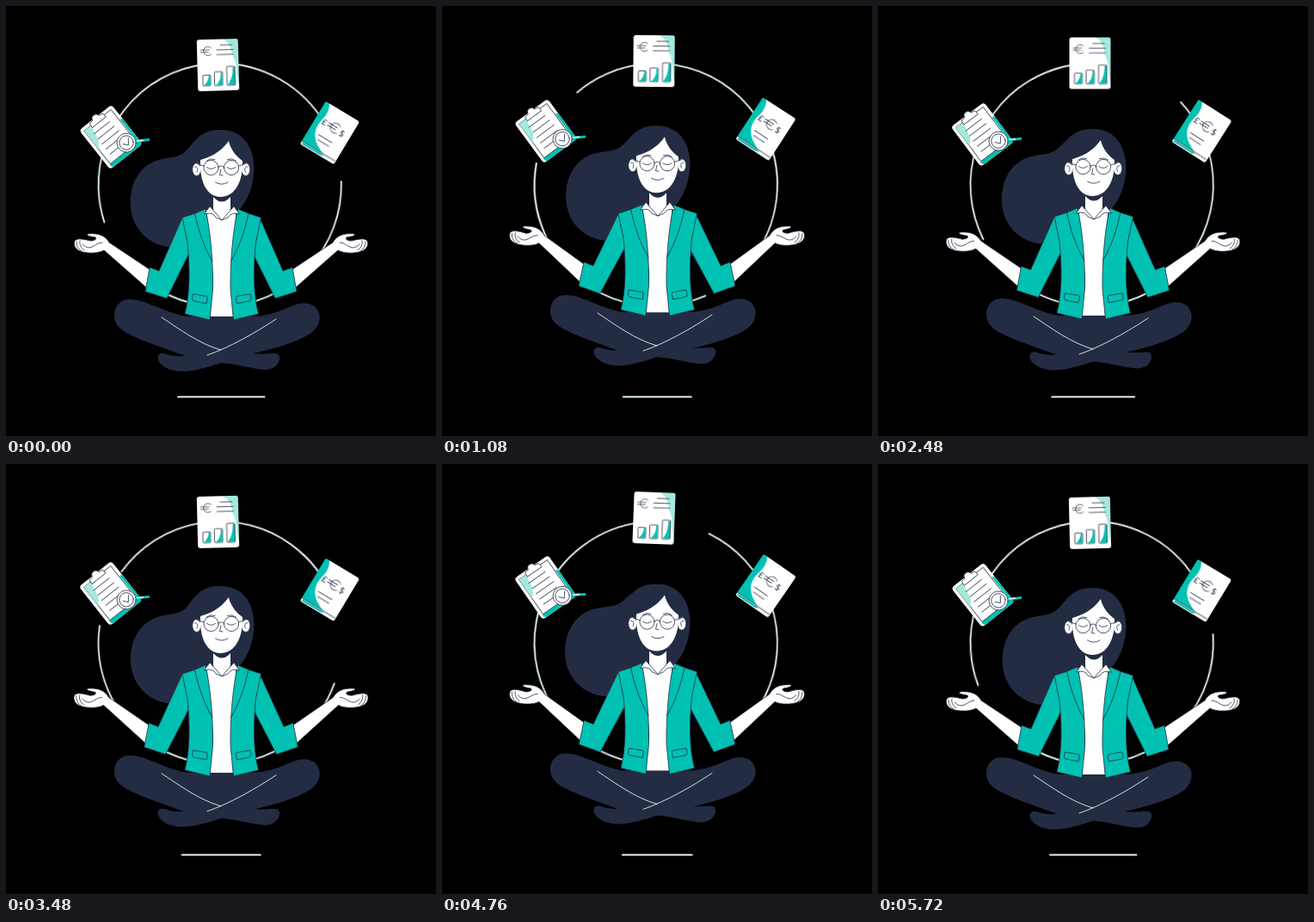
Write an HTML page that moves like this. It is 500 px wide and 500 px high and loops after 5.76 s.

```html
<!DOCTYPE html>
<html lang="en">
<head>
<meta charset="utf-8">
<title>Balance</title>
<style>
  html, body { margin: 0; width: 100%; height: 100%; overflow: hidden; background: #000; }
  svg { display: block; width: 100vw; height: 100vh; }

  .ink { fill: #242c43; }
  .teal { fill: #00c1b2; }
  .white { fill: #fff; }
  .mint { fill: #a5e8de; }
  .edge { stroke: #242c43; stroke-width: .8; stroke-linejoin: round; }
  .pen { fill: none; stroke: #242c43; stroke-width: .8; stroke-linecap: round; stroke-linejoin: round; }
  .pale { fill: none; stroke: #e2f4f2; stroke-width: 1.9; stroke-linecap: round; }
  text { font: 10px Lato, "Open Sans", sans-serif; fill: #242c43; text-anchor: middle; }

  /* one half of the sine-shaped bob lasts 1440 ms */
  .rise, .turn, .lift, .shadow {
    animation: rise 1440ms cubic-bezier(.364, 0, .636, 1) infinite alternate;
  }
  .turn { animation-name: turn; }
  .lift { animation-name: rise, turn; }
  .shadow { animation-name: shrink; transform-origin: 250px 454px; }
  .late { animation-delay: -2722ms, -2592ms; }
  .spin { animation: spin 5760ms linear infinite; transform-origin: 248.7px 208px; }

  @keyframes rise { from { translate: 0 0; } to { translate: var(--x, 0px) var(--y); } }
  @keyframes turn { from { rotate: 0deg; } to { rotate: var(--r); } }
  @keyframes shrink { from { transform: scaleX(1); } to { transform: scaleX(.755); } }
  @keyframes spin { to { transform: rotate(360deg); } }

  .body { --y: -5.6px; }
  .legs { --y: -5.8px; }
  .feet { --y: -7.8px; }
  .hair { --x: 1.5px; --y: -8.5px; --r: 3.2deg; transform-origin: 250px 165px; }
  .arm { --r: 2.5deg; transform-origin: 206px 250px; }
  .item { --y: -6.5px; --r: 4.1deg; }
  .board { --x: -2px; --y: -10.2px; }
</style>
</head>
<body>
<svg viewBox="0 0 500 500">
  <defs>
    <path id="euro" class="pen" d="M5.5-4.2A5.8 5.8 0 1 0 5.5 4.2M-8-1.5H3M-8 1.5H2"/>

    <g id="arm">
      <path class="white edge" d="M168 307L120 275C116 268 109 263.500 95 265C93 267 98 268 104 269C106 271 103 273 98 273C90 271 83 269.500 80 273C78 278 81 283 86 285C94 288 107 288 114 284L164 328Z"/>
      <path class="pen" d="M112 275C106 275 103 280 97 281C93 281 91 279 89 277M82 274C82 279 84 283 88 285M86 273C85 277 87 281 91 284"/>
      <path class="teal" d="M205 246L178 308L167 304L162 332L187 340L214 286L228 255Z"/>
      <path class="pen" d="M205 246L178 308L167 304L162 332L187 340L212.500 288"/>
    </g>

    <g id="panel">
      <path class="teal edge" d="M205 246Q219 242 232 236C238 262 241 300 240.500 330L237 365L208 358C214 335 214 305 211 275Z"/>
      <path class="pen" d="M219.500 241C224 262 230 280 240 297"/>
      <path class="pen" d="M218 335L233 337.500Q235 338 234 341L233 346L218 343Q216 342 216.500 339Z"/>
    </g>

    <g id="side">
      <ellipse class="white edge" cx="221.700" cy="190" rx="5" ry="7.500"/>
      <path class="pen" d="M219.500 187C222 186 224 189 222 193"/>
    </g>

    <g id="eye">
      <circle class="pen" cx="238.500" cy="188" r="8.600"/>
      <path class="pen" d="M233.500 187.500Q238.500 191.500 243.500 187.500M233 180Q238 176.500 243 178.500M230 186L222 183.500"/>
    </g>
  </defs>

  <g class="spin">
    <circle class="pale" cx="248.7" cy="208" r="141.2" pathLength="360"
      stroke-dasharray="124.300 39.300 168.500 27.900" transform="rotate(-1.600 248.700 208)"/>
  </g>

  <!-- report -->
  <g transform="translate(246.500 68.700)"><g class="lift late item"><g transform="rotate(-1.900)">
    <rect class="white" x="-24" y="-30" width="48" height="60" rx="3"/>
    <path class="mint" d="M6-30H21Q24-30 24-27V24C21 14 23 4 19-6C15-15 18-23 6-30Z"/>
    <use href="#euro" transform="translate(-12.500 -16.500) scale(.9)"/>
    <path class="pen" d="M3-23H17M-1-17.500H18M-1-12H18"/>
    <g class="white edge">
      <rect x="-18" y="11.500" width="9" height="12.500" rx="1"/>
      <rect x="-4.500" y="8" width="9.500" height="16" rx="1"/>
      <rect x="10" y="2" width="9.500" height="22" rx="1"/>
    </g>
    <path class="teal" d="M-17 23.500Q-12 20-11 12H-9.400V23.500ZM-3 23.500Q3 19 3 9H4.600V23.500ZM11 23.500Q17 16 17 3H19V23.500Z"/>
  </g></g></g>

  <!-- clipboard -->
  <g transform="translate(122 152.700)"><g class="lift late item board"><g transform="rotate(-38.800)">
    <rect class="white" x="-24" y="-29" width="48" height="58" rx="4"/>
    <path class="teal" d="M-21 24H21V-10L24-8V25Q24 29 20 29H-18Q-22 28-21 24Z"/>
    <path class="white edge" d="M-20-25H20V24H-20Z"/>
    <path class="mint" d="M-20-25H-9C-13-16-10-6-20 2Z"/>
    <path class="white edge" d="M-10-22V-26Q-10-28-7-28H-5Q-4-32.500 0-32.500T5-28H7Q10-28 10-26V-22Z"/>
    <path class="pen" d="M-13-15H10M-13-7.500H11M-13 0H12M-13 7.500H11M-13 15H2"/>
  </g></g></g>
  <g transform="translate(140 159.200)"><g class="lift late item"><g transform="rotate(-8)">
    <path d="M11 0H26" fill="none" stroke="#00c1b2" stroke-width="3" stroke-linecap="round"/>
    <path d="M12-.4H20" fill="none" stroke="#fff" stroke-width="1.400"/>
    <circle class="white edge" r="11"/>
    <circle class="pen" r="8.200"/>
    <path class="pen" d="M3-5L2 3L-4 1"/>
  </g></g></g>

  <!-- book -->
  <g transform="translate(376.500 147.700)"><g class="lift late item"><g transform="rotate(30.600)">
    <rect class="white" x="-23" y="-29" width="46" height="58" rx="2.500"/>
    <path class="teal" d="M-23 25V-26.500Q-23-29-20.500-29H-18C-13-21-14-14-16-6C-18 6-14 18 7 25Z"/>
    <path class="pen" d="M-22 25H22"/>
    <path class="teal" d="M-21 26H8L4 28H-21Z"/>
    <use href="#euro" transform="translate(1.500 -8) scale(1.050)"/>
    <text x="-11.500" y="-4.500">£</text>
    <text x="12.500" y="-3">$</text>
    <path class="pen" d="M-10 8.500H8M-8 14H7"/>
  </g></g></g>

  <!-- hair behind -->
  <path class="ink lift late hair" d="M240 152C226 154 218 160 212 166C202 179 190 175 174 181C155 188 145 207 145 229C145 260 168 281 196 281L250 262Z"/>
  <path class="ink rise body" d="M250 144C232 143 222 152 212 166V225L215 250H255L268 240C279 231 288.500 210 288.500 188C288 162 274 144 250 144Z"/>

  <!-- legs -->
  <path class="ink rise feet" d="M235 396C212 411 195 408 184 404C175 402 174 412 182 418C195 428 215 427 250 415C280 417 300 428 312 420C320 414 320 404 313 404C300 404 285 407 265 398Z"/>
  <g class="rise legs">
    <path class="ink" d="M209 361C190 357 172 348 160 344Q152 341 144 341C126 341 121 362 131 373C142 385 180 396 214 409L250 405L283 405C315 398 340 390 355 380C367 371 368 355 357 348C349 344 341 345 332 349C320 354 308 359 292 361Z"/>
    <path class="pale" style="stroke-width:.9" d="M181 362C202 376 225 393 250 400M314 364C290 380 260 397 234 406"/>
  </g>

  <!-- torso, arms, head -->
  <g class="rise body">
    <g class="turn arm"><use href="#arm"/></g>
    <g transform="matrix(-1 0 0 1 500 0)"><g class="turn arm"><use href="#arm"/></g></g>
    <path class="white" d="M233 237H268L262 300L264 361H237L241 320L238 280Z"/>
    <use href="#panel"/>
    <use href="#panel" transform="matrix(-1 0 0 1 501.500 0)"/>
    <path class="white" d="M241 215H261V236L251 249L241 236Z"/>
    <path class="ink" d="M241 213H261V222Q251 233 241 222Z"/>
    <path class="white edge" d="M237 233L230.500 242Q241 239 244 246L251 249ZM265 233L271.500 242Q262 239 258 246L251 249Z"/>

    <use href="#side"/>
    <use href="#side" transform="matrix(-1 0 0 1 500.500 0)"/>
    <path class="white" d="M259 157C249 171 236 176 226 179C225 195 229 222 250 222C271 221 276 195 275 180C268 175 261 167 259 157Z"/>
    <use href="#eye"/>
    <use href="#eye" transform="matrix(-1 0 0 1 500.500 0)"/>
    <path class="pen" d="M247 187Q250 184.500 253.500 187M250 190L248.500 196.500L252 197M243.500 205Q251 209.500 258 205"/>
  </g>

  <path class="pale shadow" d="M200 454.500H300.500"/>
</svg>
</body>
</html>
```
